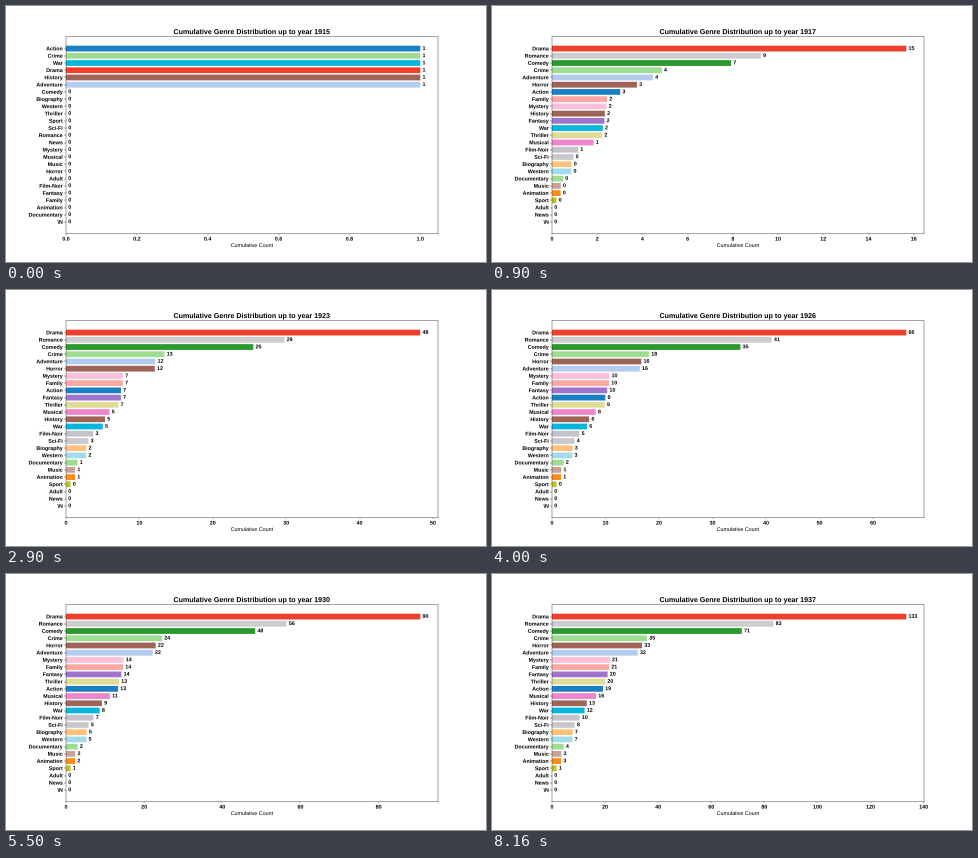
A matplotlib script for the animation above (8320 ms loop, 480 px wide and 256 px high).

```python
import matplotlib.pyplot as plt
from matplotlib.animation import FuncAnimation
from matplotlib.patheffects import Normal

plt.rcParams.update({
    "font.family": "Liberation Sans",
    "font.size": 12,
    "font.weight": "bold",
    "axes.titlesize": 16,
    "axes.titleweight": "bold",
    "text.hinting": "none",
    # Draw text as outlines and keep edges off the pixel grid.
    "path.effects": [Normal()],
    "path.snap": False,
})

LOOP_MS = 8320
TICK_MS = 40
STEP_MS = 100
LAST_MS = 8160
LAST_POS = 81.25
FIRST_YEAR = 1915
YEARS_PER_STEP = 4 / 15

# name, first count, last count, colour
GENRES = [
    ("Action", 1, 19.2, "#1a7fc4"),
    ("Crime", 1, 35.8, "#9edc92"),
    ("War", 1, 12.25, "#06b6dc"),
    ("Drama", 1, 133.45, "#ee402c"),
    ("History", 1, 13.1, "#9f6458"),
    ("Adventure", 1, 32.3, "#b4cdee"),
    ("Comedy", 0, 71.5, "#2a9a2e"),
    ("Biography", 0, 7.8, "#ffc07c"),
    ("Western", 0, 7.7, "#a2dcec"),
    ("Thriller", 0, 20.01, "#e0dc94"),
    ("Sport", 0, 1.75, "#c4c024"),
    ("Sci-Fi", 0, 8.55, "#c9c9cd"),
    ("Romance", 0, 83.4, "#cdcdcd"),
    ("News", 0, 0.01, "#808080"),
    ("Mystery", 0, 21.75, "#fbbfda"),
    ("Musical", 0, 16.6, "#ee86cc"),
    ("Music", 0, 3.5, "#caa29a"),
    ("Horror", 0, 33.9, "#9f6458"),
    ("Adult", 0, 0.02, "#808080"),
    ("Film-Noir", 0, 10.4, "#c6c2cc"),
    ("Fantasy", 0, 20.95, "#a074cc"),
    ("Family", 0, 21.5, "#fca8a2"),
    ("Animation", 0, 3.45, "#ff8c1a"),
    ("Documentary", 0, 4.4, "#9edc92"),
    (r"\N", 0, 0, "#808080"),
]
EASE = {"Family": 0.99}  # slightly ahead early on


def position(tick):
    """Progress in steps; the final pose is held at the end of the loop."""
    ms = tick * TICK_MS
    if ms >= LAST_MS:
        return LAST_POS
    return min((ms + TICK_MS // 2) // STEP_MS, 80)


def ranking(pos):
    """Rows of (value, name, colour), largest first."""
    part = pos / LAST_POS
    rows = [(first + (last - first) * part ** EASE.get(name, 1), name, colour)
            for name, first, last, colour in GENRES]
    return sorted(rows, key=lambda row: -row[0])


fig, ax = plt.subplots(figsize=(15, 8), dpi=32)
fig.subplots_adjust(left=0.125, right=0.9, bottom=0.11, top=0.88)

count = len(GENRES)
bars = ax.barh(range(count), [0] * count, height=0.8)
values = [ax.annotate("", (0, y), xytext=(5, 0), textcoords="offset points",
                      va="center", ha="left")
          for y in range(count)]
title = ax.set_title("")
ax.set_xlabel("Cumulative Count")
ax.set_yticks(range(count))
ax.set_ylim(count + 0.64, -1.64)


def update(tick):
    pos = position(tick)
    rows = ranking(pos)
    for bar, label, (value, _, colour) in zip(bars, values, rows):
        bar.set_width(value)
        bar.set_facecolor(colour)
        label.xy = (value, label.xy[1])
        label.set_text(str(int(value)))
    ax.set_yticklabels([name for _, name, _ in rows])
    ax.set_xlim(0, rows[0][0] * 1.05)
    year = FIRST_YEAR + round(pos * YEARS_PER_STEP)
    title.set_text(f"Cumulative Genre Distribution up to year {year}")
    return []


anim = FuncAnimation(fig, update, frames=LOOP_MS // TICK_MS,
                     interval=TICK_MS, repeat=True, repeat_delay=0)
plt.show()
```
